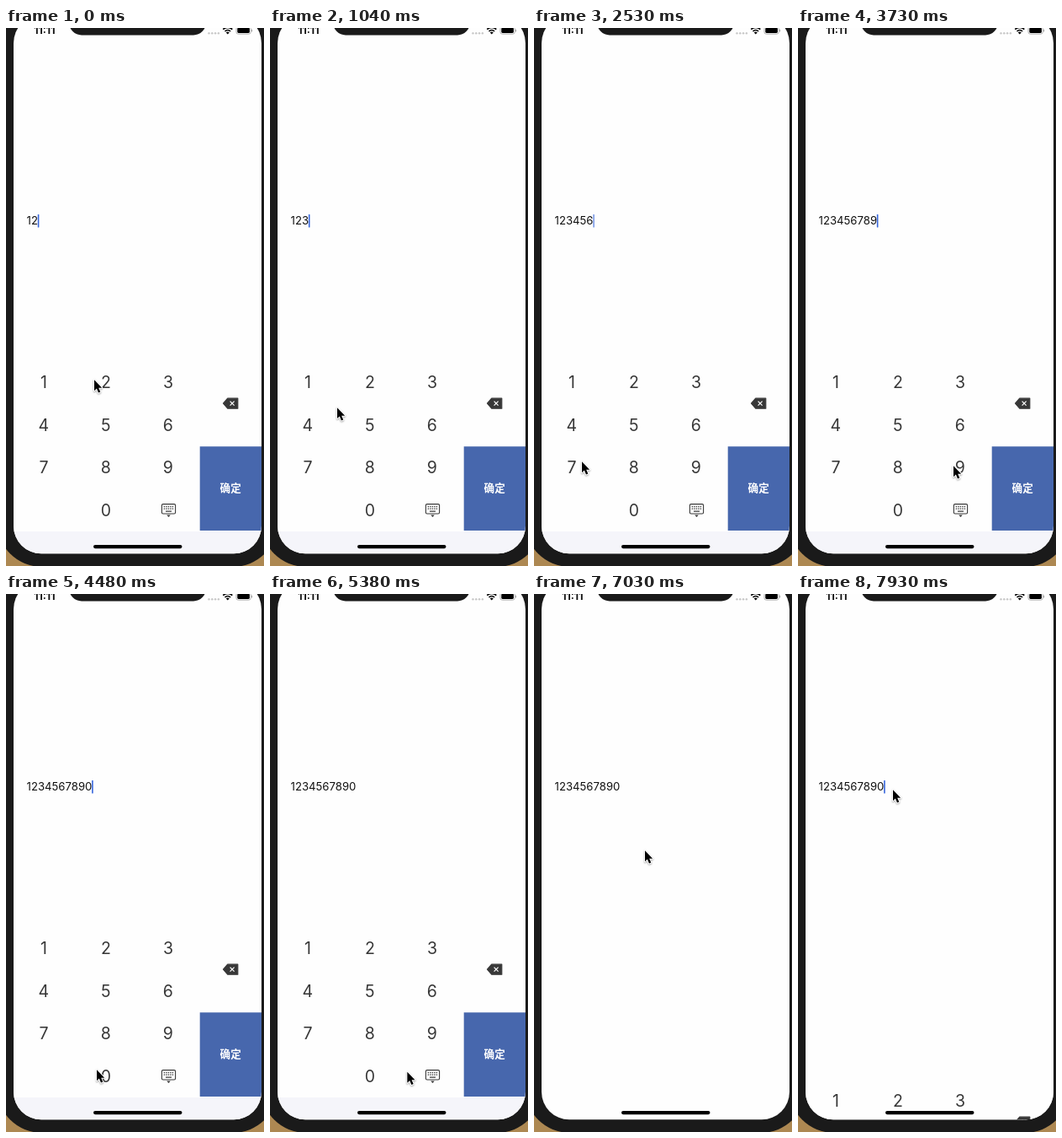
These frames come from a looping animation (307x638 px, 8 s). An HTML page with a canvas:

```html
<!DOCTYPE html>
<html lang="zh">
<head>
<meta charset="utf-8">
<title>Number keypad</title>
<style>
  html, body { margin: 0; width: 100%; height: 100%; overflow: hidden; background: #ad8852; }
  canvas { display: block; width: 307px; height: 638px; }
</style>
</head>
<body>
<canvas id="stage"></canvas>
<script>
const W = 307, H = 638, LOOP = 8000, TICK = 150;
const INK = '#383838', BEZEL = '#1a1a1a', PAPER = '#fefefe';
const canvas = document.getElementById('stage');
const ratio = window.devicePixelRatio || 1;
canvas.width = W * ratio;
canvas.height = H * ratio;
const ctx = canvas.getContext('2d');
ctx.scale(ratio, ratio);

const DIGITS = '1234567890';
const ROW_TIME = 1490;
const BLUR = 6130, FOCUS = 7893, SLIDE = 281, KEYPAD_DROP = 240;

// Places where the pointer rests.
const stops = [
  { x: 105, y: 417, arrive: 0, leave: 150 },
  { x: 177, y: 418, arrive: 450, leave: 600 },
  { x: 46, y: 461, arrive: 1040, leave: 1100 },
  { x: 197, y: 468, arrive: 1790, leave: 1940 },
  { x: 57, y: 514, arrive: 2450, leave: 2600 },
  { x: 185, y: 519, arrive: 3430, leave: 3900 },
  { x: 108, y: 564, arrive: 4480, leave: 4930 },
  { x: 196.5, y: 568, arrive: 5700, leave: 6580 },
  { x: 132, y: 304, arrive: 7030, leave: 7200 },
  { x: 113, y: 232, arrive: 7780, leave: LOOP }
];

const clamp = v => Math.max(0, Math.min(1, v));
const progress = (t, from, to) => clamp((t - from) / (to - from));
const smooth = u => u * u * (3 - 2 * u);
const easeOut = u => 1 - (1 - u) ** 2;

// Digits sit three to a row, with the zero in the middle of the last one.
const keyCell = i => i === 9 ? { col: 1, row: 3 } : { col: i % 3, row: Math.floor(i / 3) };

// Every row is typed in the same rhythm.
function pressTime(i) {
  const { col, row } = keyCell(i);
  return row * ROW_TIME + (col - 1) * (col ? 480 : 300);
}

function pointerAt(t) {
  const next = stops.findIndex(s => s.leave >= t);
  const to = stops[next], from = stops[Math.max(0, next - 1)];
  const u = smooth(progress(t, from.leave, to.arrive));
  return { x: from.x + (to.x - from.x) * u, y: from.y + (to.y - from.y) * u };
}

function keypadOffset(t) {
  const slide = start => easeOut(progress(t, start, start + SLIDE));
  return KEYPAD_DROP * (slide(BLUR) - slide(FOCUS));
}

function caretAlpha(t, lastPress) {
  if (t > BLUR && t < FOCUS) return 0;
  const phase = (t - (t >= FOCUS ? FOCUS : lastPress)) % 1050;
  return 1 - progress(phase, 500, 680) + progress(phase, 950, 1050);
}

// Each picture is held for one tick; the clock slips slightly early on.
function hold(t) {
  const lag = 20 * progress(t, 600, 1940);
  return Math.max(0, Math.floor((t + lag) / TICK) * TICK - lag);
}

function text(str, x, y, font, color, align = 'left') {
  ctx.font = font;
  ctx.fillStyle = color;
  ctx.textAlign = align;
  ctx.fillText(str, x, y);
}

function rect(x, y, w, h, color, radius = 0) {
  ctx.fillStyle = color;
  ctx.beginPath();
  ctx.roundRect(x, y, w, h, radius);
  ctx.fill();
}

function outline(x, y, w, h, radius, color, width) {
  ctx.strokeStyle = color;
  ctx.lineWidth = width;
  ctx.beginPath();
  ctx.roundRect(x, y, w, h, radius);
  ctx.stroke();
}

function shape(d, fill, stroke, width) {
  const path = new Path2D(d);
  ctx.lineJoin = 'round';
  if (stroke) {
    ctx.strokeStyle = stroke;
    ctx.lineWidth = width;
    ctx.stroke(path);
  }
  if (fill) {
    ctx.fillStyle = fill;
    ctx.fill(path);
  }
}

function drawDeleteIcon() {
  shape('M258.5 445.2l5.2-6H275.8v12H263.7z', INK, INK, 1.2);
  shape('M266.6 442.7l5 5m0-5l-5 5', null, '#fff', 1.2);
}

function drawHideIcon() {
  outline(185.4, 564.6, 16.2, 11.4, 1.5, INK, 1.1);
  for (let i = 0; i < 10; i++)
    rect(187.7 + i % 5 * 2.5, 567 + Math.floor(i / 5) * 2.5, 1.4, 1.3, INK);
  rect(190, 572.5, 7, 1.3, INK);
  shape('M191.2 577.6h4.6l-2.3 2.4z', INK);
}

function drawKeypad(offset) {
  ctx.save();
  ctx.translate(0, offset);
  rect(9, 395, 295, 202, PAPER);
  rect(9, 597, 295, 40, '#f5f5fa');
  [...DIGITS].forEach((digit, i) => {
    const { col, row } = keyCell(i);
    text(digit, 44.9 + col * 74, 427.2 + row * 50.5, '19.5px Inter, sans-serif', INK, 'center');
  });
  drawDeleteIcon();
  drawHideIcon();
  rect(230.7, 496.3, 74, 99.7, '#4767ad');
  text('确定', 267.2, 550, '700 12.6px "Noto Sans CJK SC", "Noto Sans CJK", sans-serif', '#fff', 'center');
  ctx.restore();
}

function drawStatusBar() {
  rect(75, -30, 163, 38.4, BEZEL, 15);
  text('11:11', 45.8, 7.3, '700 12.3px Inter, sans-serif', '#111', 'center');
  for (let i = 0; i < 4; i++) rect(240.3 + i * 3.8, 5, 2.4, 2.4, '#c8c8c8', 1.2);
  shape('M258.3 1.6a8 8 0 0 1 11 0M260.5 4a4.8 4.8 0 0 1 6.6 0', null, '#000', 1.7);
  shape('M263.8 7.5l-2-2.2q2-1.6 4 0z', '#000');
  outline(274, -1.6, 17.2, 8.8, 2.4, '#a0a0a0', 0.8);
  rect(275.3, -0.3, 14.6, 6.2, '#000', 1.4);
  rect(292.1, 1.4, 1, 3, '#a0a0a0', 0.5);
}

function drawField(t) {
  const pressed = [...DIGITS].filter((digit, i) => pressTime(i) <= t);
  const value = pressed.join('');
  text(value, 24.6, 233.4, '13.15px Inter, sans-serif', '#111');
  const caretX = 24.4 + ctx.measureText(value).width;
  ctx.globalAlpha = caretAlpha(t, pressTime(pressed.length - 1));
  rect(caretX, 221, 1.6, 15.5, '#3565dc', 0.6);
  ctx.globalAlpha = 1;
}

function drawPointer({ x, y }) {
  const arrow = 'M0 .3V13.2L2.9 10.6L5 15.6L7.3 14.6L5.2 9.8H9.2Z';
  ctx.save();
  ctx.translate(x, y);
  ctx.shadowColor = 'rgba(0,0,0,.35)';
  ctx.shadowBlur = 2 * ratio;
  ctx.shadowOffsetY = ratio;
  shape(arrow, null, '#fff', 2);
  ctx.shadowColor = 'transparent';
  shape(arrow, '#000');
  ctx.restore();
}

function draw(t) {
  rect(0, 0, W, H, '#ad8852');
  rect(-11, -33, 335, 672, BEZEL, 54);
  ctx.save();
  ctx.beginPath();
  ctx.roundRect(9, -15, 295, 638.3, 33);
  ctx.clip();
  rect(0, 0, W, H, PAPER);
  drawStatusBar();
  drawField(t);
  drawKeypad(keypadOffset(t));
  rect(104, 613, 105.5, 4.2, '#000', 2.1);
  ctx.restore();
  drawPointer(pointerAt(t));
}

const startTime = performance.now();
function frame() {
  draw(hold((performance.now() - startTime) % LOOP));
  requestAnimationFrame(frame);
}
frame();
</script>
</body>
</html>
```
